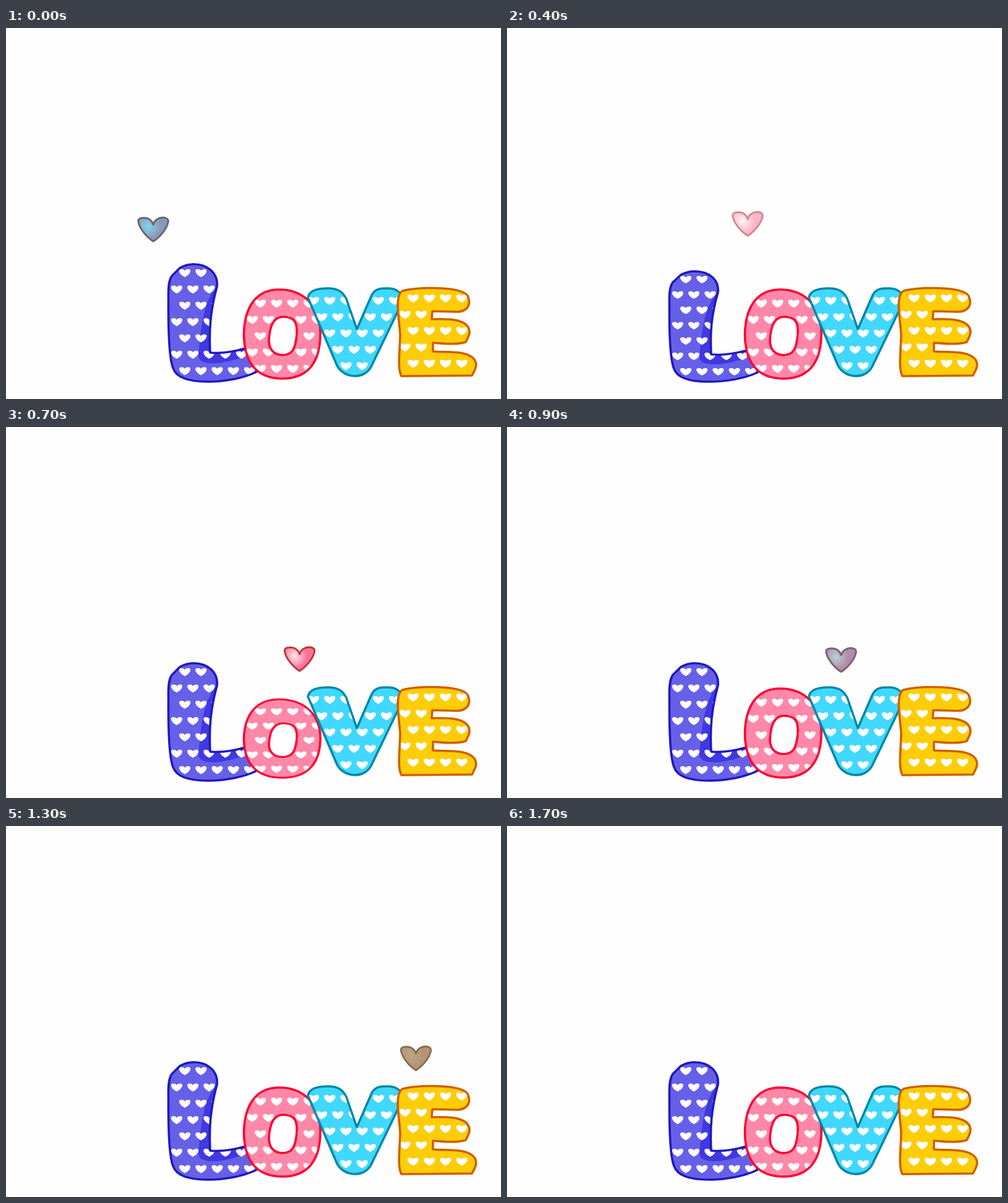
These frames come from a looping animation (800 by 600 pixels, 1.8 s). An HTML page:

```html
<!DOCTYPE html>
<html>
<head>
<meta charset="utf-8">
<style>
  html, body { margin: 0; height: 100%; overflow: hidden; background: #fefefe; }
  svg { display: block; width: 800px; height: 600px; }
</style>
</head>
<body>
<svg viewBox="0 0 800 600">
  <defs>
    <path id="dot" fill="#fff" d="M0-3C-1-6-4-6-6-6C-9-6-10-3-8 0C-7 3-3 5 0 7C3 5 7 3 8 0C10-3 9-6 6-6C4-6 1-6 0-3Z"/>
    <radialGradient id="glow" gradientUnits="userSpaceOnUse" cx="-8" cy="-4" r="20">
      <stop/><stop offset="1"/>
    </radialGradient>
  </defs>
  <g id="letters"></g>
  <path id="heart" fill="url(#glow)" stroke-width="3" stroke-linejoin="round"
    d="M0-7C-2-14-8-18-15-18C-22-18-25-16-24-11C-22 0-10 14 0 20C10 14 22 0 24-11C25-16 22-18 15-18.500C8-18 2-14 0-7Z"/>
</svg>
<script>
const LOOP = 1800, STEP = 100, BEAT = 200, GAP = 26.2;

// The dots form a staggered grid from (x, y); odd rows are offset by half a gap.
const letters = [
  { fill: '#6660e8', line: '#2018c0', base: 573, x: 289, y: 396, cols: 5, stagger: -1,
    d: 'M262.500 440C262 420 263 408 268 401L281 388C290 383 296 382 303 382C328 382 343 398 341 418C330 458 328 490 330 525C350 527 370 523 387 518L415 535L405 556C385 566 355 572 326 572C295 572 275 565 270 550C264 535 262 500 262.500 440Z',
    shade: 'M341 418C320 440 315 480 311 530C311 548 355 546 400 525L387 518C370 523 350 527 330 525C328 490 330 458 341 418Z' },
  { fill: '#ff88a8', line: '#ff0033', base: 569, x: 398, y: 419, cols: 5, stagger: 1,
    d: 'M441 423C486 423 509 455 508 497C507 545 484 567 447 567C404 567 384 540 384.500 493C386 450 405 423 441 423ZM448 467C466 467 471 476 470 495C468 518 463 529 447 529C430 528 425 518 425 505C426 482 432 467 448 467Z' },
  { fill: '#40d8ff', line: '#0088a8', base: 565, x: 497, y: 441, cols: 6, stagger: 1,
    d: 'M488 436C490 424 505 421 520 421C536 421 544 426 550 438L567 487L591 432C597 421 605 421 618 421C632 421 645 432 641 442L590 548C578 570 545 566 535 546Z' },
  { fill: '#ffcc08', line: '#d06000', base: 564, x: 658, y: 437, cols: 4, stagger: -1,
    d: 'M641 425C665 419 735 417 746 433C753 448 745 459 728 459L689 458L688 471C715 470 740 471 747 484C752 492 747 500 743 508C725 513 705 510 690 509V523C715 525 745 521 757 536C763 545 758 553 753 562L639 563C632 550 637 520 637 495C636 475 627 432 641 425Z' }
];

// One point per beat: high and low points of the bounce in turn.
const bounce = [
  [238, 325], [313, 372], [389, 316], [443, 411], [506, 338],
  [574, 414], [634, 340], [691, 410], [755, 340]
];

const tints = [
  { at: 0, glow: '#78d8e8', fill: '#8c98b8', line: '#70626f' },
  { at: 400, glow: '#fff4f8', fill: '#fbb4c6', line: '#d8888a' },
  { at: 700, glow: '#ffe4ec', fill: '#ff7098', line: '#b8383c' },
  { at: 1100, glow: '#6cbcc4', fill: '#62a8bc', line: '#408ca4' },
  { at: 1300, glow: '#b8a880', fill: '#b69278', line: '#827252' },
  { at: 1500, glow: '#ffe090', fill: '#f8cc88', line: '#e0b254' }
];

function dotGrid({ x, y, cols, stagger }) {
  let dots = '';
  for (let row = 0; row < 7; row++)
    for (let col = 0; col < cols; col++) {
      const left = x + GAP * (col + row % 2 * stagger / 2);
      dots += `<use href="#dot" x="${left}" y="${y + row * 26.4}"/>`;
    }
  return dots;
}

function letterMarkup(letter, i) {
  const { d, fill, line, shade = '' } = letter;
  return `<g><clipPath id="clip${i}"><path d="${d}" clip-rule="evenodd"/></clipPath>
    <path d="${d}" fill="${fill}" fill-rule="evenodd"/>
    <g clip-path="url(#clip${i})"><path d="${shade}" fill="#4038e0"/>${dotGrid(letter)}</g>
    <path d="${d}" fill="none" stroke="${line}" stroke-width="3.6" stroke-linejoin="round"/></g>`;
}

const group = document.getElementById('letters');
const heart = document.getElementById('heart');
const [inner, outer] = document.querySelectorAll('#glow stop');
group.innerHTML = letters.map(letterMarkup).join('');

function draw(t) {
  letters.forEach(({ base }, i) => {
    const peak = BEAT * (2 * i + 1) + STEP;
    const s = 1 - .06 * Math.max(0, 2 - Math.abs(t - peak) / STEP);
    group.children[i].setAttribute('transform', `translate(0 ${base * (1 - s)}) scale(1 ${s})`);
  });

  const leg = Math.min(Math.floor(t / BEAT), bounce.length - 2);
  const [x, y] = bounce[leg].map((v, i) => v + (bounce[leg + 1][i] - v) * (t / BEAT - leg));
  heart.setAttribute('transform', `translate(${x} ${y})`);
  heart.style.visibility = t > 1600 ? 'hidden' : 'visible';

  const from = tints.findLast(k => k.at <= t);
  const to = tints.find(k => k.at > t) || from;
  const part = to === from ? 0 : (t - from.at) / (to.at - from.at) * 100;
  const mix = key => `color-mix(in srgb, ${to[key]} ${part}%, ${from[key]})`;
  heart.style.stroke = mix('line');
  inner.style.stopColor = mix('glow');
  outer.style.stopColor = mix('fill');
}

const start = performance.now();
function tick() {
  const t = (performance.now() - start) % LOOP;
  draw(Math.floor(t / STEP) * STEP);
  requestAnimationFrame(tick);
}
tick();
</script>
</body>
</html>
```
